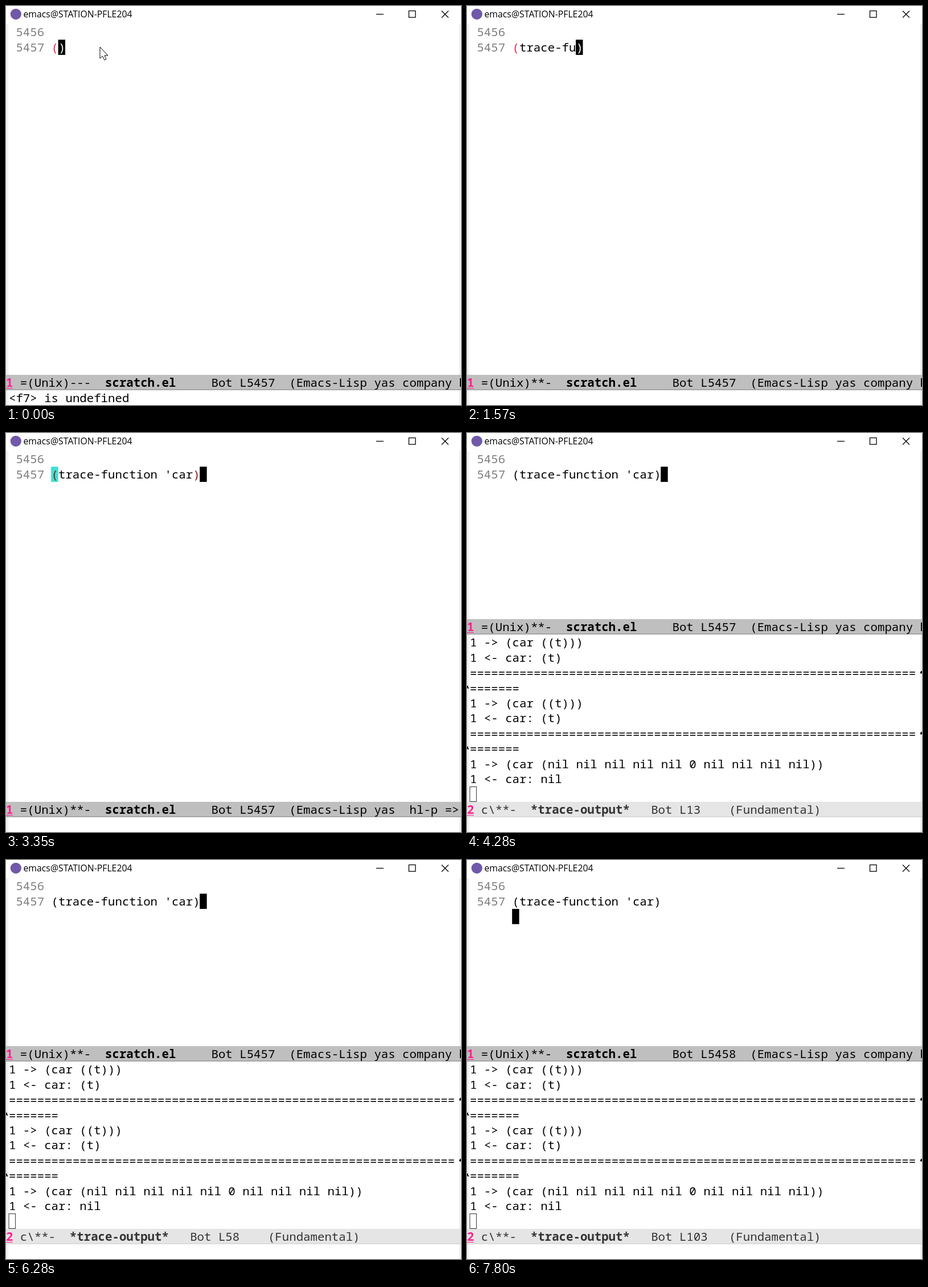
These frames come from a looping animation (799 by 701 pixels, 8 s). An HTML page with a canvas:

```html
<!DOCTYPE html>
<html lang="en">
<head>
<meta charset="utf-8">
<title>Editor trace session</title>
<style>
  html, body { margin: 0; width: 100%; height: 100%; overflow: hidden; background: #fff; }
  canvas { display: block; }
</style>
</head>
<body>
<canvas id="stage" width="799" height="701"></canvas>
<script>
const ctx = document.getElementById('stage').getContext('2d');
const LOOP = 8000, CELL = 12.43, ROW = 26.72, LEFT = 5;
const MONO = '20.72px "Noto Sans Mono", monospace';
const RULE = '='.repeat(63);

// Typed text between the parentheses: [time, text]
const typing = [
  [0, ''], [260, 't'], [520, 'tr'], [770, 'tra'], [840, 'trac'], [1060, 'trace'],
  [1260, 'trace-'], [1440, 'trace-f'], [1530, 'trace-fu'], [1610, 'trace-fun'],
  [1700, 'trace-func'], [1900, 'trace-function'], [2160, 'trace-function '],
  [2520, "trace-function '"], [2690, "trace-function 'ca"], [2970, "trace-function 'car"]
];

// Trace pane: [time, cursor on the new line, line number, position of the list call, its number]
const trace = [
  [4280, 0, 13, 2, 0], [4950, 1, 19, 0, 0], [5070, 1, 22, 2, 0], [5290, 1, 31, 0, -1]
];
// Each cursor move logs three calls, seen in two stages
[[5490, 5620], [5820, 5950], [6080, 6280], [6410, 6550], [6675, 6800],
 [7000, 7130], [7330, 7460], [7600, 7800]].forEach(([start, end], i) => {
  const down = i % 2, line = 31 + 9 * i;
  trace.push([start, down, line + 6, 0, 0], [end, down, line + 9, 2, 0]);
});

const at = (list, t) => list.filter(step => step[0] <= t).pop();

function box(x, y, w, h, color) {
  ctx.fillStyle = color;
  ctx.fillRect(x, y, w, h);
}

function text(str, x, y, color = '#000', font = MONO) {
  ctx.font = font;
  ctx.fillStyle = color;
  ctx.fillText(str, x, y);
}

function path(points, width = 1.3, fill) {
  ctx.beginPath();
  points.forEach(([x, y], i) => i ? ctx.lineTo(x, y) : ctx.moveTo(x, y));
  if (fill) {
    ctx.closePath();
    ctx.fillStyle = fill;
    ctx.fill();
  }
  ctx.strokeStyle = '#000';
  ctx.lineWidth = width;
  ctx.stroke();
}

function titleBar() {
  ctx.fillStyle = '#7059a9';
  ctx.beginPath();
  ctx.arc(17.3, 14.3, 9.6, 0, 7);
  ctx.fill();
  text('emacs@STATION-PFLE204', 30.5, 20, '#000', '15.8px "Open Sans", sans-serif');
  path([[650, 14.5], [663, 14.5]]);
  ctx.strokeRect(707.5, 8.5, 11.5, 11.5);
  path([[765, 8.5], [777, 20.5]]);
  path([[777, 8.5], [765, 20.5]]);
}

function modeLine(y, active, id, state, name, rest) {
  const color = active ? '#000' : '#333';
  const bold = 'bold ' + MONO;
  const nameCol = 2 + state.length + 2;
  box(0, y, 799, ROW, active ? '#bfbfbf' : '#e5e5e5');
  box(0, y + ROW - 1, 799, 1, active ? '#858585' : '#cccccc');
  text(id, 0, y + 21, '#ff1f8f', bold);
  box(0, y + 23, 12, 1, '#ff1f8f');
  text(state, 2 * CELL, y + 21, color);
  text(name, nameCol * CELL, y + 21, color, bold);
  text(rest, (nameCol + name.length) * CELL, y + 21, color);
}

function pointer() {
  path([[165, 72], [165, 92], [169.5, 88], [173, 95], [176, 93.5],
        [173, 87], [179, 87]], 1, '#fff');
}

function codePane(t, down) {
  const word = at(typing, t)[1];
  const left = LEFT + 6 * CELL, closeX = left + (word.length + 1) * CELL;
  const done = t >= 3350, matched = done && t < 4010;
  const paren = matched ? '#8b1a1a' : done ? '#000' : '#f0274f';
  const cell = (x, y, color) => box(x - 0.4, y, CELL, ROW, color);
  text('5456', LEFT + CELL, 53.3, '#7f7f7f');
  text('5457', LEFT + CELL, 80, '#7f7f7f');
  if (matched) cell(left, 59.2, '#40e0d0');
  if (down) cell(left, 59.2 + ROW, '#000');
  else cell(closeX + (done ? CELL : 0), 59.2, '#000');
  text('(', left, 80, paren);
  text(word, left + CELL, 80);
  text(')', closeX, 80, done ? paren : '#fff');
}

function tracePane(line, listPos, n) {
  const baseline = row => 374.8 + row * ROW;
  for (let i = 0; i < 3; i++) {
    const y = baseline(4 * i), isList = i === listPos;
    const arg = isList ? `(nil nil nil nil nil ${n} nil nil nil nil)` : '((t))';
    text(`1 -> (car ${arg})`, LEFT, y);
    text(`1 <- car: ${isList ? 'nil' : '(t)'}`, LEFT, y + ROW);
    if (i < 2) {
      text(RULE, LEFT, y + 2 * ROW + 0.6);
      text('=======', LEFT, y + 3 * ROW + 0.6);
      // Continuation marks in the fringes
      const m = Math.round(y + 2 * ROW);
      box(797, m - 10, 2, 1.5, '#000');
      box(796, m - 8.5, 3, 3, '#000');
      box(0, m + 16, 2, 3.5, '#000');
      box(1, m + 19, 2, 2, '#000');
    }
  }
  ctx.strokeStyle = '#333';
  ctx.lineWidth = 1;
  ctx.strokeRect(5, 621.5, 11.6, 26);
  modeLine(648, false, '2', 'c\\**-', '*trace-output*',
    `   Bot ${('L' + line).padEnd(7)}(Fundamental)`);
}

function draw(t) {
  const step = at(trace, t), down = step && step[1];
  box(0, 0, 799, 701, '#fff');
  box(0, 32, 4.5, 669, '#f2f2f2');
  box(795.5, 32, 3.5, 669, '#f2f2f2');
  titleBar();
  codePane(t, down);
  const modes = t >= 3150 && t < 3880 ? 'yas  hl-p =>' : 'yas company hl-p';
  modeLine(step ? 327 : 648, true, '1', t < 330 ? '=(Unix)---' : '=(Unix)**-', 'scratch.el',
    `     Bot L${down ? 5458 : 5457}  (Emacs-Lisp ${modes}`);
  if (step) tracePane(step[2], step[3], step[4]);
  if (t < 330) text('<f7> is undefined', LEFT, 696);
  if (t >= 5290 && t < 5490) text('End of buffer', LEFT, 696);
  if (t < 260) pointer();
}

const start = performance.now();
function tick() {
  draw((performance.now() - start) % LOOP);
  requestAnimationFrame(tick);
}
tick();
</script>
</body>
</html>
```
